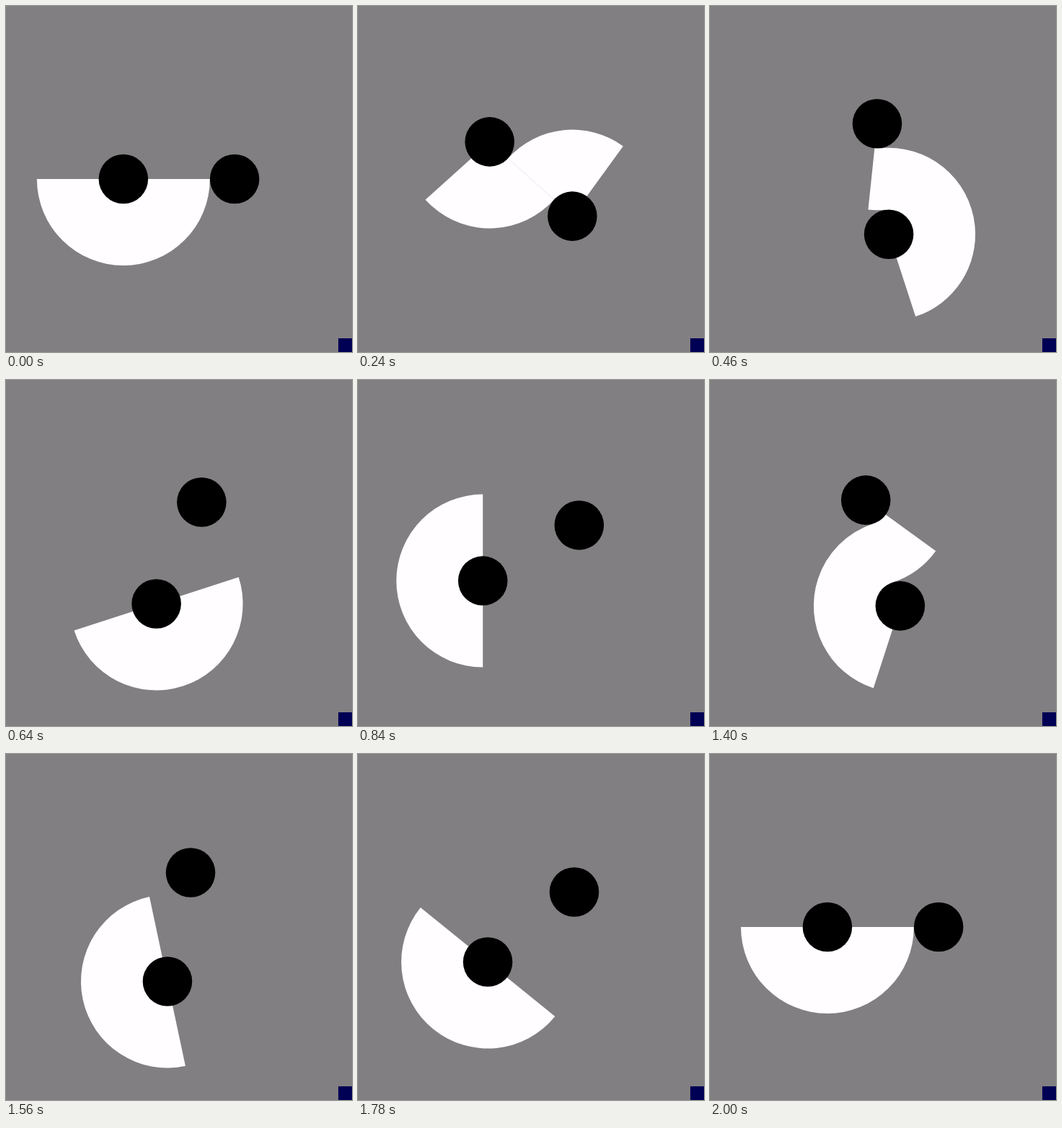
Animation of 480x480 px, one loop 2020 ms. Source, as an HTML page with a canvas:

```html
<!DOCTYPE html>
<html lang="en">
<head>
<meta charset="utf-8">
<title>Half disc handed between two dots</title>
<style>
  html, body { margin: 0; width: 100%; height: 100%; overflow: hidden; background: #817f81; }
  canvas { display: block; width: 480px; height: 480px; }
</style>
</head>
<body>
<canvas id="stage" width="480" height="480"></canvas>
<script>
const ctx = document.getElementById('stage').getContext('2d');

const CENTER = 240;
const ORBIT = 540 / 7;
const DOT = 240 / 7;
const DISC = 120;
const TICK = 20;
const TICKS = 101;

const rad = deg => deg * Math.PI / 180;

const onOrbit = deg => [
  CENTER + ORBIT * Math.cos(rad(deg)),
  CENTER + ORBIT * Math.sin(rad(deg))
];

function addSector([x, y], from, to) {
  if (to <= from) return;
  ctx.moveTo(x, y);
  ctx.arc(x, y, DISC, rad(from), rad(to));
  ctx.closePath();
}

function drawDot([x, y]) {
  ctx.fillStyle = '#000';
  ctx.beginPath();
  ctx.arc(x, y, DOT, 0, 2 * Math.PI);
  ctx.fill();
}

function draw(ms) {
  const tick = Math.floor(ms / TICK) % TICKS;
  const turn = 3 * Math.round(tick * 1.2) % 360;
  const a = onOrbit(turn);
  const b = onOrbit(turn + 180);

  // Angles relative to the line of centres; the discs turn like meshed gears.
  const spin = 2 * (turn % 180);
  const giver = [spin, 180];
  const taker = [Math.max(180, spin), 180 + spin];
  const [sectorA, sectorB] = turn < 180 ? [taker, giver] : [giver, taker];

  ctx.fillStyle = '#817f81';
  ctx.fillRect(0, 0, 480, 480);
  ctx.fillStyle = '#000054';
  ctx.fillRect(461, 461, 19, 19);

  ctx.fillStyle = '#fffdff';
  ctx.beginPath();
  addSector(a, turn + sectorA[0], turn + sectorA[1]);
  addSector(b, turn + 180 - sectorB[1], turn + 180 - sectorB[0]);
  ctx.fill();

  drawDot(a);
  drawDot(b);
}

const start = performance.now();
function loop() {
  draw(performance.now() - start);
  requestAnimationFrame(loop);
}
loop();
</script>
</body>
</html>
```
